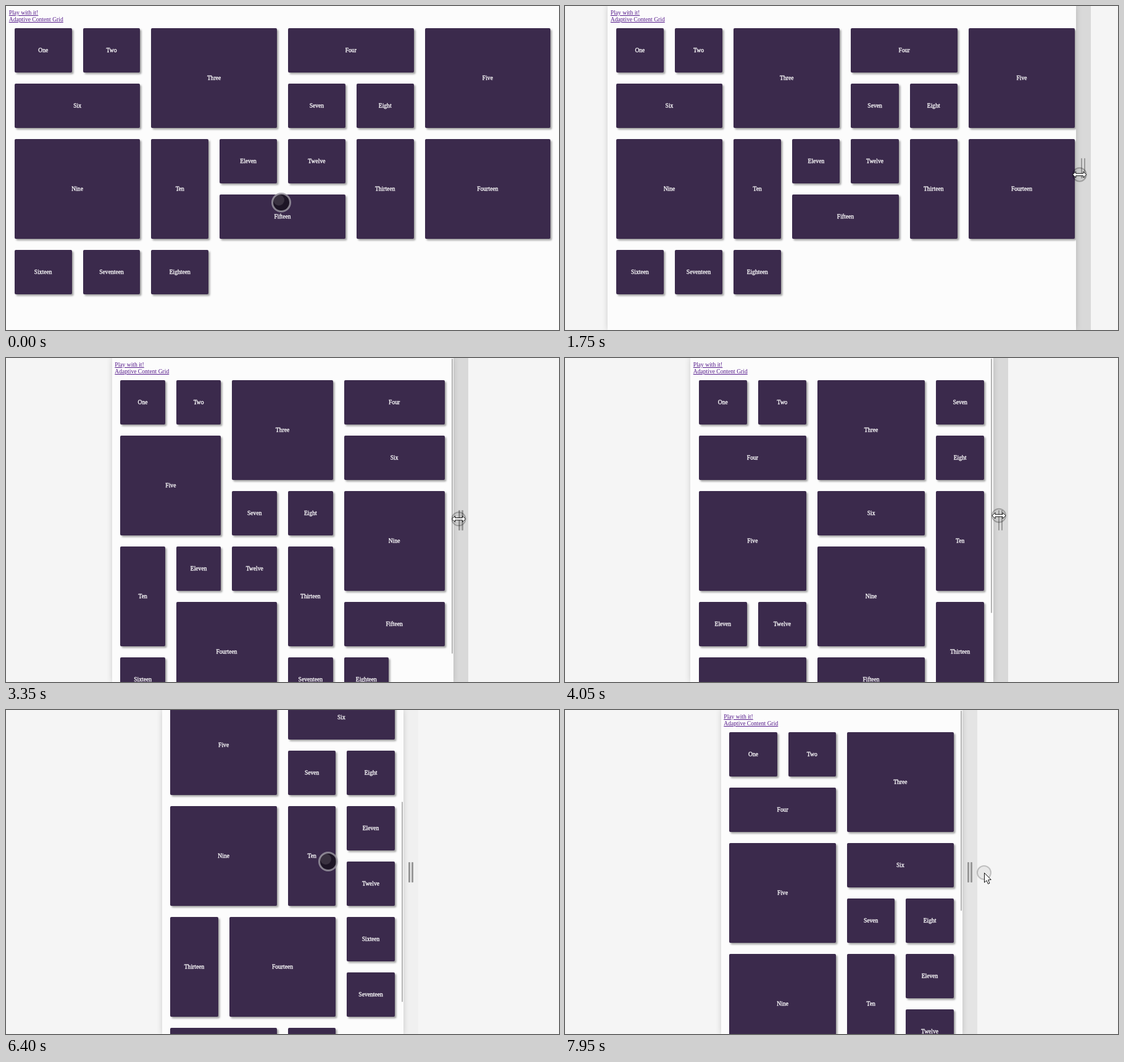
Animation of 896 by 526 pixels, one loop 8000 ms. Source, as an HTML page with a canvas:

```html
<!DOCTYPE html>
<html lang="en">
<head>
<meta charset="utf-8">
<title>Adaptive Content Grid</title>
<style>
html, body { margin: 0; width: 100%; height: 100%; overflow: hidden; background: #f5f5f5; }
#stage { position: relative; width: 896px; height: 526px; overflow: hidden; }
#panel, #shade, #handle, #thumb, #cursor { position: absolute; top: 0; }
#panel, #shade, #handle { height: 526px; }
#panel { overflow: hidden; background: #fcfcfc; }
#shade { box-shadow: 0 0 9px rgba(0,0,0,.17); }
#page { position: absolute; left: 0; top: 0; box-sizing: border-box; padding: 4.8px;
  font: 9.6px/11px "Liberation Serif", "Times New Roman", serif; }
#page u { display: block; width: max-content; color: #551a8b; }
/* never more than eight columns */
#grid { display: grid; grid-template-columns: repeat(auto-fill, minmax(max(90px, 12.4%), 1fr));
  grid-auto-rows: 90px; grid-auto-flow: dense; }
.card { margin: 9px; display: flex; align-items: center; justify-content: center;
  color: #fff; -webkit-text-stroke: .3px #fff; background: #3b2a4c; border-radius: 2px;
  box-shadow: 2.4px 2.4px 3px rgba(0,0,0,.36); }
.wide { grid-column: span 2; }
.tall { grid-row: span 2; }
#handle { width: 24px; }
#handle i { position: absolute; top: 247px; width: 2.6px; height: 33px; border-radius: 1px; background: #999; }
#thumb { width: 2px; border-radius: 1px; background: #b4b4b4; }
#cursor { left: 0; }
</style>
</head>
<body>
<div id="stage">
  <div id="handle"><i style="left:8px"></i><i style="left:13px"></i></div>
  <div id="shade"></div>
  <div id="panel">
    <div id="page">
      <u>Play with it!</u>
      <u>Adaptive Content Grid</u>
      <div id="grid"></div>
    </div>
  </div>
  <div id="thumb"></div>
  <canvas id="cursor" width="896" height="526"></canvas>
</div>
<script>
const W = 896, H = 526, LOOP = 8000, STEP = 50;
const DRAG_START = 950, DRAG_END = 5700, GRIP = 24;
const $ = id => document.getElementById(id);
const [panel, shade, page, grid, handle, thumb] =
  ['panel', 'shade', 'page', 'grid', 'handle', 'thumb'].map($);
const ctx = $('cursor').getContext('2d');

const names = ('One Two Three Four Five Six Seven Eight Nine Ten Eleven Twelve ' +
  'Thirteen Fourteen Fifteen Sixteen Seventeen Eighteen').split(' ');
const wide = ['Three', 'Four', 'Five', 'Six', 'Nine', 'Fourteen', 'Fifteen'];
const tall = ['Three', 'Five', 'Nine', 'Ten', 'Thirteen', 'Fourteen'];
for (const name of names) {
  const card = document.createElement('div');
  card.className = 'card' + (wide.includes(name) ? ' wide' : '') + (tall.includes(name) ? ' tall' : '');
  card.textContent = name;
  grid.append(card);
}

// 0 before t0, 1 after t1, linear between
const ramp = (t, t0, t1) => Math.min(1, Math.max(0, (t - t0) / (t1 - t0)));

// Gap left of the panel while it is dragged narrower
const drag = [[DRAG_START, 0], [1750, 69], [2200, 102], [2750, 129],
  [3050, 158], [4050, 203], [4850, 234], [DRAG_END, 252.5]];
const insetAt = t => drag.slice(1).reduce((sum, [t1, v1], i) =>
  sum + (v1 - drag[i][1]) * ramp(t, drag[i][0], t1), 0);

const scrollAt = t => 240 * ramp(t, 6150, 6400) + 75 * ramp(t, 6550, 6750) - 315 * ramp(t, 6900, 7600);
const hoverAt = t => 1 - ramp(t, 5850, 6050) + .52 * ramp(t, 7800, 7950);

function pointerAt(t, right) {
  if (t < DRAG_START) {
    const a = ramp(t, 0, 250), b = ramp(t, 350, 600);
    return [446 + 364 * a + 104 * b, 319 - 6 * a - 30 * b];
  }
  if (t <= DRAG_END) {
    const u = ramp(t, DRAG_START, DRAG_END);
    return [right + 5 + 7 * u, 280 - 37 * u];
  }
  const enter = ramp(t, 5750, 6050), leave = ramp(t, 7700, 7950);
  return [656 - 134 * enter + 15 * ramp(t, 6900, 7600) + 142 * leave, 243 + 3 * enter + 18 * leave];
}

function disc(x, y, r, fill, stroke, width) {
  ctx.beginPath();
  ctx.arc(x, y, r, 0, Math.PI * 2);
  ctx.fillStyle = fill;
  ctx.fill();
  if (!stroke) return;
  ctx.strokeStyle = stroke;
  ctx.lineWidth = width;
  ctx.stroke();
}

function shape(x, y, points) {
  ctx.beginPath();
  for (const [px, py] of points) ctx.lineTo(x + px, y + py);
  ctx.closePath();
  ctx.fillStyle = '#fff';
  ctx.fill();
  ctx.strokeStyle = '#111';
  ctx.lineWidth = 1;
  ctx.stroke();
}

const arrow = [[.5, .5], [.5, 16], [4, 12.8], [6.5, 18.3], [9, 17.2], [6.6, 11.9], [11.3, 11.5]];
const upper = [[-11, 0], [-6, -5], [-6, -1.8], [6, -1.8], [6, -5], [11, 0]];
const resize = upper.concat(upper.map(([x, y]) => [-x, -y]));

function drawCursor(x, y, right, pressed) {
  ctx.clearRect(0, 0, W, H);
  if (x < right) {
    disc(x, y, 14.5, 'rgba(0,0,0,.5)', 'rgba(160,156,166,.78)', 3);
    disc(x - 4, y - 4, 9, 'rgba(255,255,255,.12)');
    return;
  }
  disc(x, y, 11, 'rgba(0,0,0,.05)', `rgba(0,0,0,${pressed ? .25 : .2})`, 2);
  shape(x, y, x < right + GRIP ? resize : arrow);
}

function draw(t) {
  const inset = insetAt(t), right = W + .5 - inset, scroll = scrollAt(t);

  for (const el of [panel, shade]) {
    el.style.left = inset + 'px';
    el.style.width = right - inset + 'px';
  }
  // The layout trails the fast first part of the drag
  page.style.width = W - 2 * insetAt(t < 2200 ? t - 75 : t) + 'px';
  page.style.top = -scroll + 'px';

  const grey = Math.round(240 - 23 * hoverAt(t));
  handle.style.left = right + 'px';
  handle.style.background = `rgb(${grey},${grey},${grey})`;

  const full = page.getBoundingClientRect().height, track = H - 6;
  thumb.style.display = full > H ? 'block' : 'none';
  thumb.style.left = right - 3.5 + 'px';
  thumb.style.top = 1 + scroll / full * track + 'px';
  thumb.style.height = H / full * track + 'px';

  const [x, y] = pointerAt(t, right);
  drawCursor(x, y, right, t >= DRAG_START && t <= DRAG_END);
}

const start = performance.now();
function tick() {
  const t = (performance.now() - start) % LOOP;
  draw(Math.floor(t / STEP) * STEP);
  requestAnimationFrame(tick);
}
tick();
</script>
</body>
</html>
```
